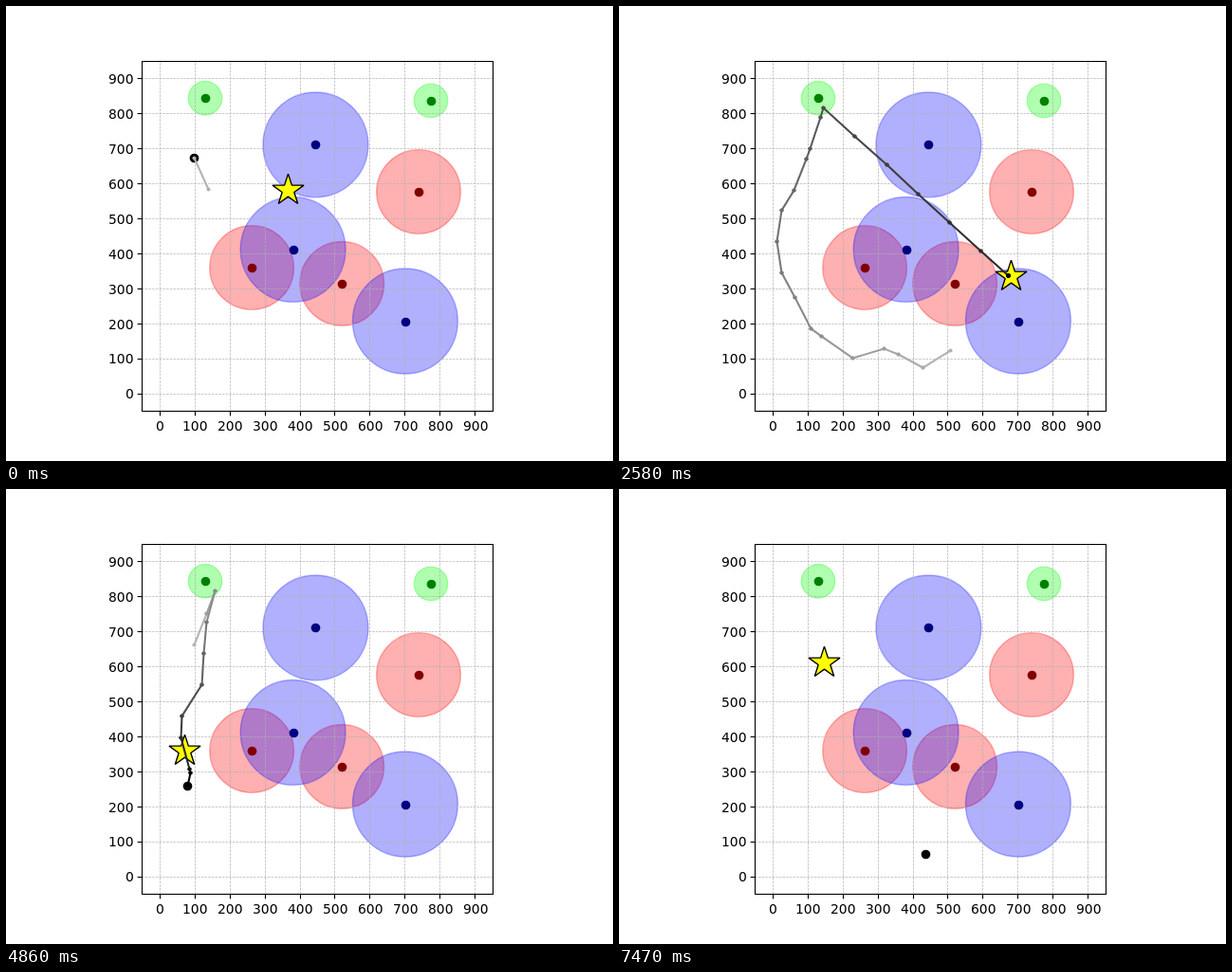
An HTML page for the animation above (7500 ms loop, 640 by 480 pixels).

```html
<!DOCTYPE html>
<html lang="en">
<head>
<meta charset="utf-8">
<title>Agent paths</title>
<style>
  html, body { margin: 0; width: 100%; height: 100%; overflow: hidden; background: #fff; }
  svg { display: block; width: 640px; height: 480px; }
  text { font: 13.89px "DejaVu Sans", sans-serif; }
</style>
</head>
<body>
<svg id="stage" viewBox="0 0 640 480"></svg>
<script>
const FRAME_MS = 30, FRAMES = 250, EPISODE_STEPS = 50;
const BOX = { left: 143.2, right: 512.8, top: 57.6, bottom: 427.2 };
const UNIT = 0.3696;            // pixels per axis unit
const MAX_STEP = 90 * UNIT;     // farthest the agent moves along either axis in one step
const DIGIT_WIDTH = 8.84;
const stage = document.getElementById('stage');

// The agent starts at the first waypoint, heads for each next one and rests on the last.
const episodes = [
  { star: [297, 194], waypoints: [[213, 193], [198, 160], [213, 98], [303, 188], [298, 193]] },
  { star: [413, 285], waypoints: [[349, 363], [320, 381], [294, 367], [279, 361], [246, 371], [202, 340],
    [171, 281], [166, 248], [171, 215], [184, 194], [201, 150], [215, 107], [410, 284]] },
  { star: [310, 247], waypoints: [[191, 281], [174, 248], [169, 215], [176, 182], [191, 149],
    [214, 91], [312, 190], [332, 223], [317, 243]] },
  { star: [188, 276], waypoints: [[198, 164], [220, 107], [211, 140], [206, 206], [185, 239],
    [184, 262], [194, 299], [191, 313]] },
  { star: [400, 240], waypoints: [[250, 340], [174, 230], [214, 101], [396, 241]] },
  { star: [216, 183], waypoints: [[323, 385]] }
];

const snap = v => Math.floor(v + 0.5) + 0.5;

function walk(waypoints) {
  let [x, y] = waypoints[0];
  const points = [[x, y]];
  for (const [tx, ty] of waypoints.slice(1)) {
    while (x !== tx || y !== ty) {
      const reach = Math.max(Math.abs(tx - x), Math.abs(ty - y));
      if (reach <= MAX_STEP) {
        [x, y] = [tx, ty];
      } else {
        x += (tx - x) * MAX_STEP / reach;
        y += (ty - y) * MAX_STEP / reach;
      }
      points.push([x, y]);
    }
  }
  return points.map(p => p.map(snap));
}

for (const e of episodes) e.path = walk(e.waypoints);

function add(parent, tag, attrs, text) {
  const el = document.createElementNS('http://www.w3.org/2000/svg', tag);
  for (const key in attrs) el.setAttribute(key, attrs[key]);
  if (text !== undefined) el.textContent = text;
  parent.appendChild(el);
  return el;
}

const line = (x1, y1, x2, y2, attrs) => add(stage, 'line', { x1, y1, x2, y2, ...attrs });

function drawZones() {
  const kinds = [
    { color: '#f00', dot: '#800000', r: 120, at: [[435, 196], [259.1, 276], [354.2, 292.9]] },
    { color: '#0f0', dot: '#008000', r: 48, at: [[210, 97.3], [448, 99.9]] },
    { color: '#00f', dot: '#000080', r: 150, at: [[326.4, 146.4], [302.6, 256.9], [420.9, 332.5]] }
  ];
  for (const { color, r, at } of kinds)
    for (const [cx, cy] of at)
      add(stage, 'circle', { cx, cy, r: r * UNIT, fill: color, stroke: color,
        'fill-opacity': 0.31, 'stroke-opacity': 0.3, 'stroke-width': 1.39 });
  drawGrid();
  for (const { dot, at } of kinds)
    for (const [x, y] of at)
      add(stage, 'circle', { cx: snap(x), cy: snap(y), r: 4.86, fill: dot });
}

function drawGrid() {
  const grid = { stroke: '#b0b0b0', 'stroke-width': 0.69, 'stroke-dasharray': '2.57 1.11' };
  const tick = { stroke: '#000', 'stroke-width': 1.11 };
  for (let v = 0; v <= 900; v += 100) {
    const px = BOX.left + (v + 50) * UNIT, py = BOX.bottom - (v + 50) * UNIT;
    const x = snap(px), y = snap(py);
    const width = String(v).length * DIGIT_WIDTH;
    line(x, BOX.bottom, x, BOX.top, grid);
    line(BOX.left, y, BOX.right, y, grid);
    line(x, 427.5, x, 432.4, tick);
    line(143.5, y, 138.6, y, tick);
    add(stage, 'text', { x: Math.round(px + 0.5 - width / 2), y: 448 }, v);
    add(stage, 'text', { x: Math.round(134.5 - width), y: Math.round(py + 5.7) }, v);
  }
}

function starPoints(radius) {
  return Array.from({ length: 10 }, (_, i) => {
    const r = i % 2 ? radius * 0.381966 : radius, a = i * Math.PI / 5;
    return (r * Math.sin(a)).toFixed(2) + ',' + (-r * Math.cos(a)).toFixed(2);
  }).join(' ');
}

drawZones();
add(stage, 'rect', { x: 143.5, y: 58.5, width: 370, height: 369, fill: 'none', stroke: '#000', 'stroke-width': 1.11 });
const agent = add(stage, 'circle', { r: 4.86 });
const star = add(stage, 'polygon', { points: starPoints(17.36), fill: '#ff0', stroke: '#000',
  'stroke-width': 1.39, 'stroke-linejoin': 'bevel' });
const trail = add(stage, 'g', {});

let shown = -1;
function render(time) {
  const frame = Math.floor(time / FRAME_MS) % FRAMES;
  if (frame === shown) return;
  shown = frame;

  // The frame that completes an episode already shows the next one's start.
  const episode = episodes[Math.floor((frame + 1) / EPISODE_STEPS)];
  const steps = (frame + 1) % EPISODE_STEPS;
  const pointAt = i => episode.path[Math.min(i, episode.path.length - 1)];

  const [ax, ay] = pointAt(steps);
  agent.setAttribute('cx', ax);
  agent.setAttribute('cy', ay);
  star.setAttribute('transform', `translate(${episode.star.map(snap)})`);

  trail.replaceChildren();
  for (let i = 0; i < steps; i++) {
    const [x1, y1] = pointAt(i), [x2, y2] = pointAt(i + 1);
    const level = Math.round(255 * Math.max(0, 0.7 - i / steps));
    const color = `rgb(${level},${level},${level})`;
    add(trail, 'line', { x1, y1, x2, y2, stroke: color, 'stroke-width': 2.08, 'stroke-linecap': 'square' });
    add(trail, 'circle', { cx: x1, cy: y1, r: 2.1, fill: color });
    add(trail, 'circle', { cx: x2, cy: y2, r: 2.1, fill: color });
  }
}

function tick() {
  render(performance.now());
  requestAnimationFrame(tick);
}
tick();
</script>
</body>
</html>
```
